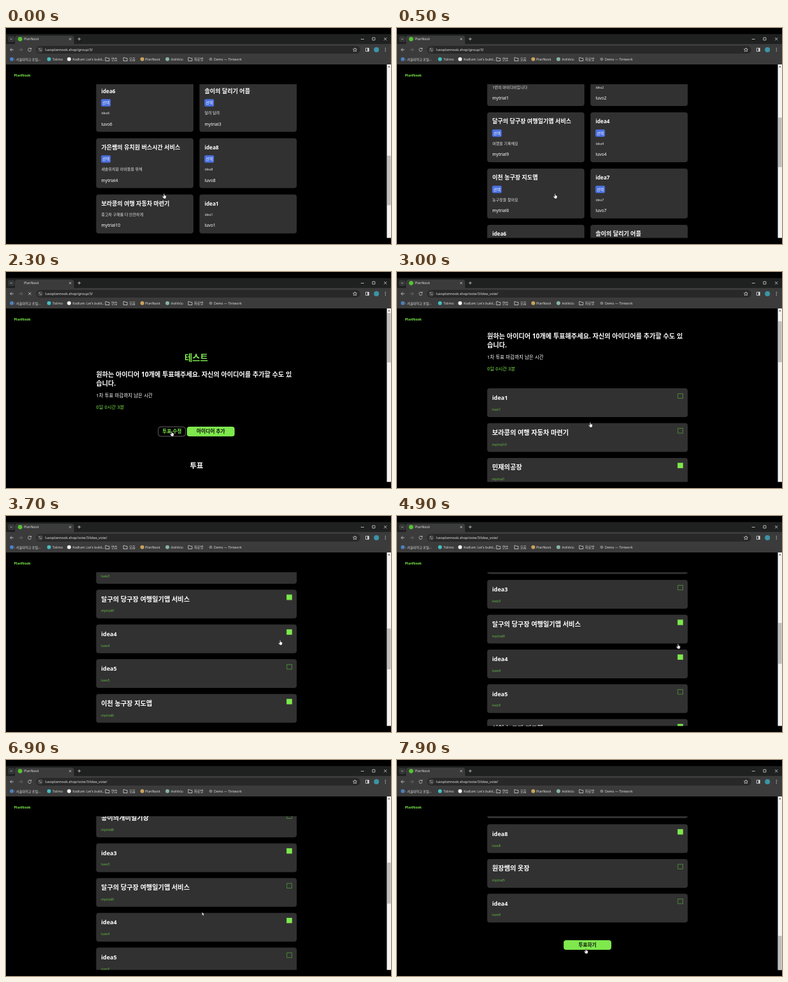
An HTML page for the animation above (8 s loop, 600 px wide and 338 px high).

```html
<!DOCTYPE html>
<html lang="ko">
<head>
<meta charset="utf-8">
<title>PlanNook</title>
<style>
@property --s { syntax: "<number>"; inherits: true; initial-value: 0; }
html, body { margin: 0; width: 100%; height: 100%; overflow: hidden; background: #000; }
svg { display: block; width: 100vw; height: 100vh; animation: scroll 8s infinite; }
text { font-family: "Noto Sans", "Noto Sans CJK KR", "Noto Sans CJK", sans-serif; fill: #fff; }
.b { font-weight: 700; }
.mid { text-anchor: middle; }
.page { transform: translateY(calc(var(--s) * -1px)); }
.ui { fill: none; stroke: #d4d4d4; stroke-width: .8; }
.ui.dim { stroke: #777; }
.group, .vote, .idle, .busy, .drop, .pick, .hand, .arrow { animation: 8s step-end infinite; }
.group { animation-name: until-swap; }
.vote { animation-name: from-swap; }
.idle { animation-name: idle; }
.busy { animation-name: busy; }
.drop { animation-name: drop; }
.pick { animation-name: pick; }
.hand { animation-name: hand; }
.arrow { animation-name: arrow; }
#thumbA { transform: translateY(calc(var(--s) * .267px)); }
#thumbB { transform: translateY(calc(var(--s) * .2207px)); }
#cursor { animation: move 8s ease-in-out infinite; }

/* One scroll position drives the pages and the scrollbar thumbs. */
@keyframes scroll {
  0% { --s: 508.5; animation-timing-function: ease-in-out; }
  12.5% { --s: 63; animation-timing-function: ease-out; }
  16%, 35% { --s: 0; animation-timing-function: ease-in-out; }
  45.5%, 57.5% { --s: 507.5; animation-timing-function: ease-in-out; }
  65%, 85% { --s: 429.5; animation-timing-function: ease-in; }
  86.25% { --s: 438; animation-timing-function: ease-in-out; }
  96.5%, 100% { --s: 957.5; }
}
@keyframes move {
  0%, 15% { transform: translate(247px, 263px); }
  23%, 33.5% { transform: translate(259px, 253px); }
  45%, 49% { transform: translate(428px, 198px); }
  56%, 59% { transform: translate(438px, 203px); }
  66%, 73.5% { transform: translate(441px, 207px); }
  77%, 80% { transform: translate(441px, 152px); }
  85.5%, 90% { transform: translate(307px, 241px); }
  97%, 100% { transform: translate(295px, 299px); }
}
@keyframes until-swap { 0% { visibility: visible; } 32.5%, 100% { visibility: hidden; } }
@keyframes from-swap { 0% { visibility: hidden; } 32.5%, 100% { visibility: visible; } }
@keyframes idle { 0%, 35%, 100% { opacity: 1; } 27.5% { opacity: 0; } }
@keyframes busy { 0%, 35%, 100% { opacity: 0; } 27.5% { opacity: 1; } }
@keyframes drop { 0% { opacity: 1; } 73%, 100% { opacity: 0; } }
@keyframes pick { 0% { opacity: 0; } 78%, 100% { opacity: 1; } }
@keyframes hand { 0%, 95.5%, 100% { opacity: 1; } 80.5% { opacity: 0; } }
@keyframes arrow { 0%, 95.5%, 100% { opacity: 0; } 80.5% { opacity: 1; } }
</style>
</head>
<body>
<svg viewBox="0 0 600 338" preserveAspectRatio="none">
  <defs><clipPath id="view"><rect y="88" width="593" height="240.5"/></clipPath>
  <clipPath id="bar"><rect x="593" y="57" width="7" height="271.5"/></clipPath></defs>
  <rect width="600" height="338"/>
  <g id="chrome"></g>
  <text class="b" x="12.5" y="76" font-size="5.3" style="fill:#79e84b">PlanNook</text>
  <g clip-path="url(#view)">
    <g class="group"><g class="page" id="group"></g></g>
    <g class="vote"><g class="page" id="vote"></g></g>
  </g>
  <g clip-path="url(#bar)">
    <rect x="593.5" y="57" width="6.5" height="272" fill="#f3f3f3"/>
    <path d="M595.2 61.5h3.4l-1.7-2.2z" fill="#555"/>
    <g class="group"><rect id="thumbA" x="594" y="64" width="5.6" height="77.5" fill="#bebebe"/></g>
    <g class="vote"><rect id="thumbB" x="594" y="64" width="5.6" height="64" fill="#bebebe"/></g>
  </g>
  <g id="cursor" fill="#fff" stroke="#222" stroke-width=".45" stroke-linejoin="round">
    <path class="hand" d="M-1.3-3.4q.7-.6 1.2 0v2.2l2.2.6q.7.3.6 1.2l-.5 2.4-.6 1h-2.6l-1.7-2.3-.8-1.3q.5-.8 1.3 0l.9.6z"/>
    <path class="arrow" d="M-1.5-3v5.2l1.2-1 .9 2 .9-.4-.9-1.9h1.6z"/>
  </g>
</svg>
<script>
const GREEN = '#7ee84d';
const $ = id => document.getElementById(id);
const text = (x, y, size, str, cls = '', fill = '#fff') =>
  `<text x="${x}" y="${y}" font-size="${size}" class="${cls}" style="fill:${fill}">${str}</text>`;
const rect = (x, y, w, h, fill, r = 0, extra = '') =>
  `<rect x="${x}" y="${y}" width="${w}" height="${h}" rx="${r}" fill="${fill}" ${extra}/>`;
const dot = (x, y, r, fill, cls = '') =>
  `<circle cx="${x}" cy="${y}" r="${r}" fill="${fill}" class="${cls}"/>`;
const line = (d, cls = '') => `<path class="ui ${cls}" d="${d}"/>`;
const korean = s => /[가-힣]/.test(s);

function browser() {
  const mark = (x, color, label, tx) => dot(x, 48.7, 3, color) + text(tx, 50.6, 5.1, label, '', '#ddd');
  const folder = (x, label) =>
    line(`M${x - 3} 46.3h2.2l.8 1h3v4.2h-6z`) + text(x + 6, 50.6, 5.3, label, '', '#ddd');
  return rect(0, 9.5, 600, 16, '#1f2020') +
    rect(3, 12.5, 10.5, 9.5, '#343535', 3) + line('M6.7 16.6l1.5 1.5 1.5-1.5') +
    rect(14, 12, 92, 18, '#3b3b3c', 4) + rect(0, 25, 600, 32, '#3b3b3c') +
    dot(22, 17.3, 3.4, '#55c232', 'idle') + text(28, 19.3, 5.1, 'PlanNook', '', '#ddd') +
    line('M98.4 15.7l3.2 3.2m0-3.2l-3.2 3.2M111.7 17.2h4.8m-2.4-2.4v4.8') +
    line('M553 17.5h5M571 15h4v4h-4zM589 15l4.4 4.4m0-4.4l-4.4 4.4') +
    line('M11.7 34H6.5m2.4-2.4L6.5 34l2.4 2.4') +
    line('M20.5 34h5.2m-2.4-2.4l2.4 2.4-2.4 2.4', 'dim') +
    line('M38.8 32.4a2.5 2.5 0 1 0 .5 2.2M39.3 31v1.9h-1.9', 'idle') +
    line('M34.8 31.7l4.4 4.4m0-4.4l-4.4 4.4', 'busy') +
    rect(47, 28, 505, 12, '#282828', 6) + dot(53.3, 34, 4.5, '#3d3d3e') +
    line('M51 32.7h2.6m1.4 0h.6M51 35.3h.6m1.4 0h2.6') +
    `<g class="group">${text(61, 36, 5.5, 'luvoplannook.shop/group/3/', '', '#e4e4e4')}</g>` +
    `<g class="vote">${text(61, 36, 5.5, 'luvoplannook.shop/vote/3/idea_vote/', '', '#e4e4e4')}</g>` +
    line('M543.8 31l.9 2 2.2.2-1.6 1.5.5 2.1-2-1.1-2 1.1.5-2.1-1.6-1.5 2.2-.2z') +
    line('M560.5 31.5h5v5h-5z') + rect(563.2, 31.5, 2.5, 5, '#d4d4d4') +
    dot(577.3, 34, 4, '#3c94a5') +
    [31.7, 34, 36.3].map(y => dot(591.3, y, .65, '#d4d4d4')).join('') +
    mark(9, '#4d7fbd', ': 서울대학교 포털...', 13) + mark(67, '#45bfc0', 'Tolimo', 72.5) +
    mark(98.3, '#f2f2f2', "Kodlum: Let's build...", 104) +
    folder(158, '연습') + folder(186, '모음') +
    mark(212.3, '#c7a25b', 'PlanNook', 217) + mark(251.5, '#86b5a6', 'AskVolu', 257) +
    folder(287, '자료방') + dot(319, 48.7, 2.5, '#777') +
    text(324, 50.6, 5.1, 'Demo — Tintwork', '', '#ddd');
}

function intro() {
  return text(296.5, 138.5, 13.3, '테스트', 'b mid', GREEN) +
    text(140.5, 163.6, 10.1, '원하는 아이디어 10개에 투표해주세요. 자신의 아이디어를 추가할 수도 있', 'b') +
    text(140.5, 177.6, 10.1, '습니다.', 'b') +
    text(140.5, 195.8, 7.5, '1차 투표 마감까지 남은 시간') +
    text(140.5, 213.5, 7.4, '0일 0시간 3분', '', GREEN);
}

function ideaCard([title, desc, user], i) {
  const x = i % 2 ? 301.5 : 140.5, row = i >> 1;
  const y = 329 + Math.min(row, 5) * 88 + Math.max(row - 5, 0) * 71;
  const chosen = row < 5, lift = chosen ? 0 : 17.8, tx = x + 8;
  return rect(x, y, 151.5, chosen ? 78 : 61, '#323132', 4) +
    text(tx, y + 17.4, korean(title) ? 9 : 8.1, title, 'b') +
    (chosen ? rect(tx - .2, y + 26.7, 14.8, 11.6, '#4b70df', 2) +
      text(tx + 7.2, y + 34.7, 6, '선택', 'mid') : '') +
    text(tx, y + 50.8 - lift, korean(desc) ? 6 : 5, desc, '', '#e6e6e6') +
    text(tx, y + 68 - lift, 6.7, user);
}

function voteCard([title, user, state], i) {
  const y = 242 + i * 54.4;
  const fill = state ? rect(437.3, y + 7.8, 8.4, 8.2, GREEN, 0, `class="${state}"`) : '';
  return rect(140.5, y, 312.5, 45, '#323132', 4) +
    text(148.3, y + 18.3, korean(title) ? 10.1 : 9, title, 'b') +
    text(148.3, y + 35.1, 5.1, user, '', '#62c43e') +
    rect(437.8, y + 8.2, 7.5, 7.4, 'none', 0, 'stroke="#4c9a35" stroke-width=".8"') + fill;
}

const rows = s => s.trim().split('\n').map(r => r.trim().split('|'));

const ideas = rows(`
  민재의공장|1번의 아이디어입니다|mytrial1
  idea2|idea2|luvo2
  달구의 당구장 여행일기앱 서비스|여행을 기록해요|mytrial9
  idea4|idea4|luvo4
  이천 농구장 지도앱|농구장을 찾아요|mytrial6
  idea7|idea7|luvo7
  idea6|idea6|luvo6
  솔이의 달리기 어플|달려 달려|mytrial3
  가은쌤의 유치원 버스시간 서비스|새솔유치원 아이들을 위해|mytrial4
  idea8|idea8|luvo8
  보라콩의 여행 자동차 마련기|중고차 구매를 더 안전하게|mytrial10
  idea1|idea1|luvo1
  콩이의개미일기장|개미를 관찰해요|mytrial8
  idea3|idea3|luvo3`);

const votes = rows(`
  idea1|luvo1
  보라콩의 여행 자동차 마련기|mytrial10
  민재의공장|mytrial1|on
  idea2|luvo2|on
  동네 산책 지도|mytrial2
  콩이의개미일기장|mytrial8
  idea3|luvo3|pick
  달구의 당구장 여행일기앱 서비스|mytrial9|drop
  idea4|luvo4|on
  idea5|luvo5
  이천 농구장 지도앱|mytrial6|on
  idea6|luvo6|on
  솔이의 달리기 어플|mytrial3|on
  idea7|luvo7|on
  가은쌤의 유치원 버스시간 서비스|mytrial4|on
  idea8|luvo8|on
  원장쌤의 옷장|mytrial5
  idea4|luvo9`);

$('chrome').innerHTML = browser();
$('group').innerHTML = intro() +
  rect(237.2, 242.3, 42.6, 14.8, 'none', 4, 'stroke="#8a8a8a" stroke-width=".7"') +
  text(258.7, 252.4, 7.6, '투표 수정', 'b mid', GREEN) +
  rect(282, 242, 74.3, 15.3, GREEN, 4) +
  text(319.2, 252.4, 7.7, '아이디어 추가', 'b mid', '#111') +
  text(297, 306.8, 11.4, '투표', 'b mid') +
  ideas.map(ideaCard).join('');
$('vote').innerHTML = intro() + votes.map(voteCard).join('') +
  rect(259.7, 1239.5, 74.3, 15, GREEN, 4) +
  text(296.8, 1249.7, 7.6, '투표하기', 'b mid', '#111');
</script>
</body>
</html>
```
